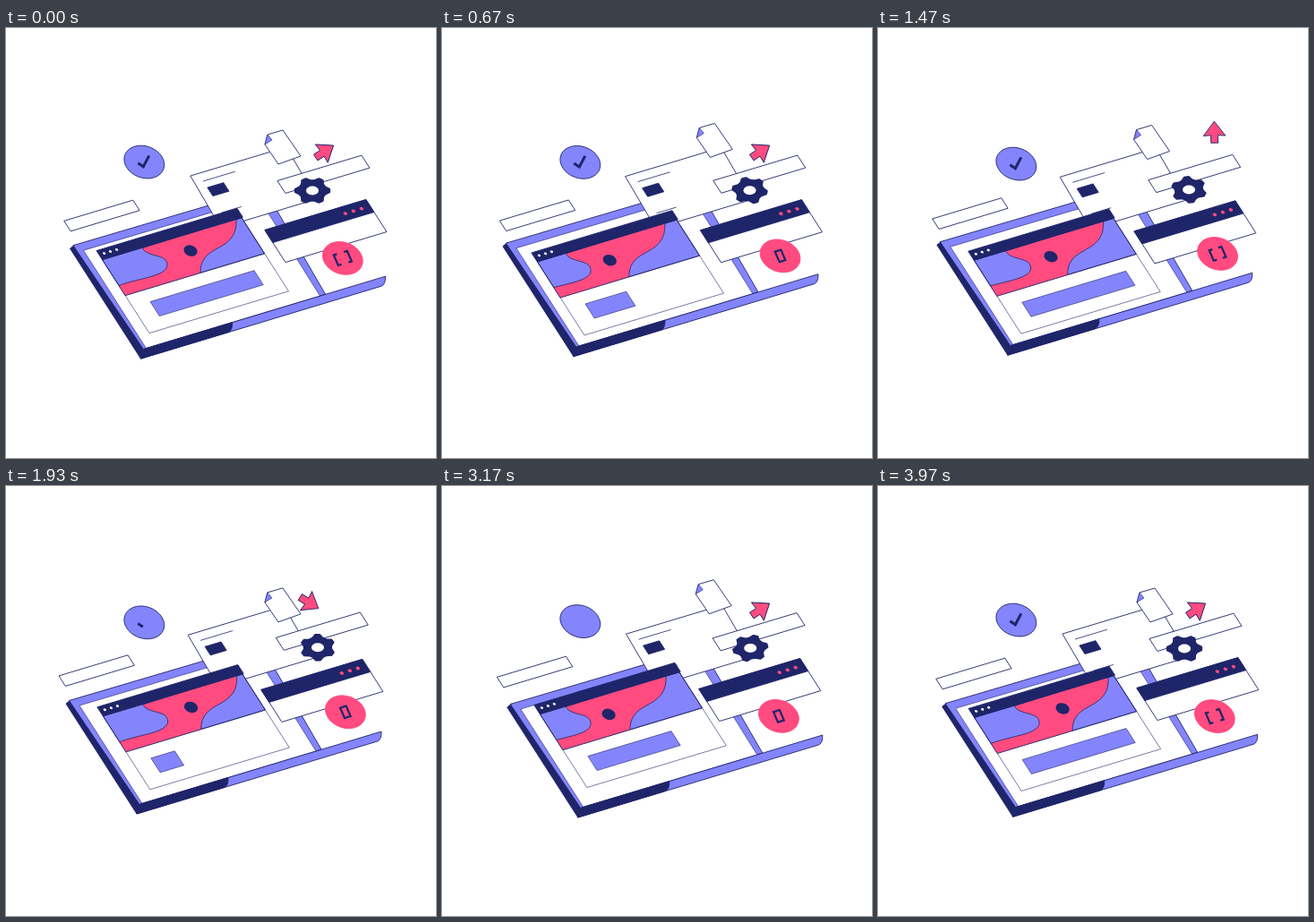
An HTML page with a canvas that plays this animation: 480x480 px, repeating every 4000 ms.

```html
<!DOCTYPE html>
<html lang="en">
<head>
<meta charset="utf-8">
<title>Floating interface</title>
<style>
html, body { margin: 0; height: 100%; overflow: hidden; background: #fff; }
canvas { display: block; }
</style>
</head>
<body>
<canvas id="stage" width="480" height="480"></canvas>
<script>
const g = document.getElementById('stage').getContext('2d');
const LOOP = 4000, BEAT = LOOP / 3, SWAY = LOOP / 2, TAU = Math.PI * 2;
const RISE = 0.301; // every plane climbs this much per pixel to the right
const NAVY = '#1f2569', PURPLE = '#8485fd', PINK = '#ff4b80', WHITE = '#fff';
let now = 0;

const clamp = v => Math.max(0, Math.min(1, v));
const swing = (peak, period = LOOP) => Math.cos(TAU * (now - peak) / period);

// Floats from the given place by (dx, dy) and back once per period
function drift(x, y, dx, dy, rest, draw, period) {
  const k = (1 - swing(rest, period)) / 2;
  g.save();
  g.translate(x + dx * k, y + dy * k);
  draw();
  g.restore();
}

function paint(fill, line, width = 0.9) {
  if (fill) { g.fillStyle = fill; g.fill(); }
  if (line) { g.strokeStyle = line; g.lineWidth = width; g.stroke(); }
}

function trace(p, closed) {
  g.beginPath();
  for (let i = 0; i < p.length; i += 2) g.lineTo(p[i], p[i + 1]);
  if (closed) g.closePath();
}

function poly(p, fill, line = NAVY, width) {
  trace(p, true);
  paint(fill, line, width);
}

function stroke(p, width) {
  trace(p, false);
  paint(null, NAVY, width);
}

// Flat rectangle lying in the tilted plane, from its far left corner
function slab(x, y, w, h, fill, width, skew = 0.64) {
  const up = RISE * w, in_ = skew * h;
  poly([x, y, x + w, y - up, x + w + in_, y - up + h, x + in_, y + h], fill, NAVY, width);
}

const rule = (x, y, w) => stroke([x, y, x + w, y - RISE * w], 0.8);

function oval(x, y, r, fill, line) {
  g.beginPath();
  g.ellipse(x, y, r, r * 0.77, 0.35, 0, TAU);
  paint(fill, line);
}

function dots(x, y, step, r, fill) {
  for (let i = 0; i < 3; i++) oval(x + step * i, y - RISE * step * i, r, fill);
}

function rail(w, fill) {
  const x = 155 + w, y = 359 - RISE * w;
  g.beginPath();
  g.moveTo(155, 359);
  g.lineTo(x, y);
  g.quadraticCurveTo(x + 0.5, y + 9, x - 4.5, y + 11);
  g.lineTo(151, 370);
  g.closePath();
  paint(fill, NAVY);
}

function laptop() {
  poly([72, 247, 77, 243, 155, 359, 151, 370], NAVY);
  poly([75.5, 243.5, 289, 180.5, 357, 298, 154, 359.5], PURPLE);
  poly([87, 249, 283, 191, 351, 300, 157, 358.4], WHITE, NAVY, 0.6);
  rail(269, PURPLE);
  rail(98, NAVY);
}

function card() {
  slab(0, 0, 107, 58, WHITE, 0.9, 0.586);
  rule(14, 6, 36);
  rule(35, 41, 22);
  slab(19, 13, 18, 9.5, NAVY);
}

function picture() {
  const shift = (swing(0, SWAY) - 1) / 2;
  const edge = (range, ...c) => c.map((v, i) =>
    v + range * shift * (i % 2 ? -RISE : 1));
  const left = edge(17, 152, 245, 158, 256, 180, 251, 180, 264, 180, 277, 145, 279, 126, 287);
  const right = edge(9.5, 217, 273, 217, 260, 222, 253, 235, 246, 250, 238, 258, 231, 257, 212);
  const follow = p => {
    g.lineTo(p[0], p[1]);
    g.bezierCurveTo(...p.slice(2, 8));
    g.bezierCurveTo(...p.slice(8));
  };
  g.save();
  slab(107.5, 258, 155.5, 40, PURPLE);
  g.clip();
  g.beginPath();
  follow(left);
  g.lineTo(100, 300);
  g.lineTo(100, 330);
  g.lineTo(right[0], 330);
  follow(right);
  g.closePath();
  paint(PINK, NAVY, 0.8);
  g.restore();
  slab(107.5, 258, 155.5, 40, null, 0.6);
  oval(206 + 23.4 * shift, 248 - 11 * shift, 7.8, NAVY);
}

// Shrinks quickly once per beat, then eases back out
function buttonWidth() {
  const p = now / BEAT % 1;
  return p < 0.41
    ? 1 - 0.9 * clamp((p - 0.33) / 0.08) ** 3
    : 1 - 0.9 * (1 - (p - 0.41) / 0.59) ** 2.3;
}

function browser() {
  slab(107.5, 258, 155.5, 82, WHITE, 0.6);
  picture();
  slab(101, 248, 157, 10, NAVY);
  dots(109.5, 251, 7, 1.7, WHITE);
  slab(161, 305, 116 * buttonWidth(), 16, PURPLE, 0.6);
}

function paper() {
  poly([292, 119, 309, 114, 329, 143, 304, 152, 289, 130], WHITE);
  poly([292, 119, 297, 125, 289, 130], PURPLE, NAVY, 0.6);
}

function gear() {
  const teeth = 6, steps = teeth * 4, points = [];
  for (let i = 0; i < steps; i++) {
    const a = TAU * (now / LOOP / teeth + (i - 0.5) / steps);
    const r = i % 4 < 2 ? 19.5 : 15.5;
    points.push(r * Math.cos(a), r * 0.75 * Math.sin(a));
  }
  g.lineJoin = 'round';
  poly(points, NAVY, NAVY, 1.5);
  g.beginPath();
  g.ellipse(0, 0, 7, 5, 0, 0, TAU);
  paint(WHITE);
}

function panel() {
  slab(0, 0, 113, 36, WHITE);
  slab(0, 0, 113, 14, NAVY);
  dots(90, -18.5, 9, 2.3, PINK);
}

function brackets() {
  oval(0, 0, 23, PINK, PINK);
  const open = clamp(0.5 + 0.55 * swing(-0.04 * BEAT, BEAT));
  const x = 5.8 + 4.2 * open, y = 4.7 - 1.2 * open;
  const half = [3.6 - x, -1.1 - y, -x, -y, 5 - x, 11.5 - y, 8.6 - x, 10.4 - y];
  stroke(half, 2.2);
  stroke(half.map(v => -v), 2.2);
}

// The tick is rubbed out and drawn again once per beat
function check() {
  oval(0, 0, 23, PURPLE, NAVY);
  const p = now / BEAT % 1;
  const shown = p < 0.425 ? 1 - clamp((p - 0.3) / 0.06) : clamp((p - 0.425) / 0.075);
  if (!shown) return;
  g.setLineDash([21.5 * shown, 99]);
  stroke([-7, 1.2, -1, 5.2, 5.5, -7.2], 3);
}

// Flies one counter-clockwise loop, then rests
function arrow() {
  const x = clamp((now - 1095) / 1140);
  const u = x < 0.5 ? 2 * x * x : 1 - 2 * (1 - x) ** 2;
  const a = TAU * (0.25 - u);
  g.save();
  g.translate(354 + 22 * Math.cos(a), 113 + 26 * Math.sin(a));
  g.rotate(0.6 * Math.sin(Math.PI * u) - 0.6 - TAU * u);
  poly([14, 0, -2, -12.3, -1.5, -4, -10, -4, -10, 4, -1.5, 4, -2, 12.3], PINK);
  g.restore();
}

function draw(t) {
  now = t % LOOP;
  g.clearRect(0, 0, 480, 480);
  drift(1, 0.2, -7.2, -5, 3400, laptop);
  drift(206, 165, -3, 1.4, 3700, card);
  drift(-1.1, 3, 3.2, -7, 800, browser);
  arrow();
  drift(0, 0, -6.2, -10, 0, paper, SWAY);
  drift(303, 170.5, -1.8, -1.2, 200, () => slab(0, 0, 94, 14, WHITE));
  drift(342, 181.5, 6, -1.2, 0, gear);
  drift(289, 225.5, -4.4, 2, 200, panel);
  drift(375.5, 257.5, 3.6, -5.6, 3600, brackets);
  drift(154.3, 149.5, 0, 3, 200, check);
  drift(65, 215.5, -6.4, -3.8, 250, () => slab(0, 0, 77, 11.5, WHITE));
}

const start = performance.now();
function tick() {
  draw(performance.now() - start);
  requestAnimationFrame(tick);
}
tick();
</script>
</body>
</html>
```
